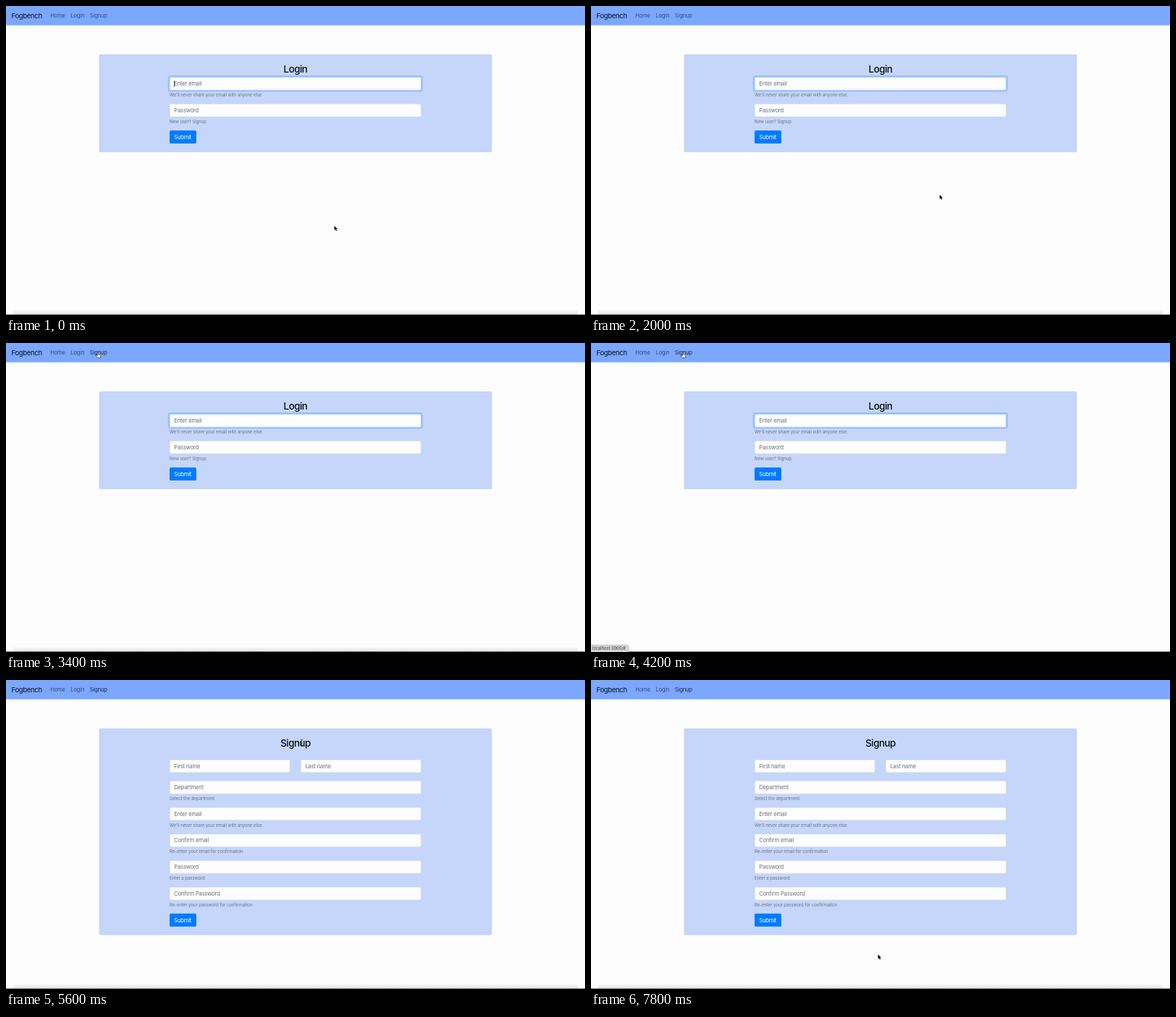
Write an HTML page that moves like this. It is 800 px wide and 427 px high and loops after 8 s.

```html
<!DOCTYPE html>
<html lang="en">
<head>
<meta charset="utf-8">
<title>Login and signup</title>
<style>
html, body { margin: 0; width: 100%; height: 100%; overflow: hidden; background: #fdfdfd; }
svg { display: block; width: 100%; height: 100%; }
text { font-family: Inter, "Open Sans", sans-serif; font-size: 7.62px; letter-spacing: -.024em; }
.brand { font-size: 9.52px; letter-spacing: -.035em; fill: #000; fill-opacity: .9; }
.link { fill: #000; fill-opacity: .54; }
.link.on { fill-opacity: .75; }
.title { font-size: 13.33px; font-weight: 500; letter-spacing: -.036em; text-anchor: middle; fill: #0b0d12; }
.hint { font-size: 6.1px; letter-spacing: -.013em; fill: #6c757d; }
.holder { fill: #6c757d; }
.button { fill: #fff; }
.status { font-size: 5.7px; letter-spacing: 0; fill: #333; }
</style>
</head>
<body>
<svg id="stage" viewBox="0 0 800 427" preserveAspectRatio="none"></svg>
<script>
const LOOP = 8000, STEP = 200, SIGNUP_AT = 4400;

const rect = (x, y, w, h, fill, more = '') =>
  `<rect x="${x}" y="${y}" width="${w}" height="${h}" fill="${fill}" ${more}/>`;
const text = (x, y, cls, s, more = '') => `<text x="${x}" y="${y}" class="${cls}" ${more}>${s}</text>`;

const panel = (h, title) =>
  rect(128.5, 66.7, 542.9, h, '#c5d6fa', 'rx="1.9"') + text(400, 91.5, 'title', title);

function field(y, label, hint = '', x = 226, w = 347.7, focus = false) {
  const ring = focus ? rect(x - 1.2, y - 1.2, w + 2.4, 20.5, 'none', 'rx="2.6" stroke="#94c0fb" stroke-width="2"') : '';
  const edge = focus ? '#80bdff' : '#ced4da';
  return ring +
    rect(x + .24, y + .24, w - .48, 17.6, '#fdfdfd', `rx="1.7" stroke="${edge}" stroke-width=".48"`) +
    text(x + 6.3, y + 11.75, 'holder', label) +
    (hint && text(x, y + 26.6, 'hint', hint));
}

const submit = y => rect(226, y, 37, 18.1, '#007bff', 'rx="1.9"') + text(232.2, y + 11.8, 'button', 'Submit');

const share = "We'll never share your email with anyone else.";

const login = panel(135.4, 'Login') +
  field(98.3, 'Enter email', share, 226, 347.7, true) +
  field(135.1, 'Password', 'New user? Signup') +
  submit(172) +
  rect(232.2, 103.2, .7, 8.6, '#111', 'id="caret"');

const signup = panel(285.8, 'Signup') +
  field(109.9, 'First name', '', 226, 166.5) +
  field(109.9, 'Last name', '', 407.2, 166.5) +
  field(139.3, 'Department', 'Select the department') +
  field(176, 'Enter email', share) +
  field(212.7, 'Confirm email', 'Re-enter your email for confirmation') +
  field(249.4, 'Password', 'Enter a password') +
  field(286.1, 'Confirm Password', 'Re-enter your password for confirmation') +
  submit(322.7);

const pointers = {
  arrow: `<path d="M0 0V6.1L1.4 4.9L2.4 7.1L3.4 6.7L2.5 4.5H4.4Z" fill="#000" stroke="#fff" stroke-width=".6" paint-order="stroke"/>`,
  hand: `<path d="M-.7 .6Q0-.5.7.6V2.9L3.3 3.6Q4 3.9 3.9 4.7L3.2 7.8H-.5L-2.4 5.1Q-2.5 4.1-1.5 4.4L-.7 5Z" fill="#fff" stroke="#111" stroke-width=".6"/>`,
  beam: `<path d="M-1.5-4.3Q0-4.2 0-3.2Q0-4.2 1.5-4.3M0-3.2V3.2M-1.5 4.3Q0 4.2 0 3.2Q0 4.2 1.5 4.3M-.7 1.4H.7" fill="none" stroke="#222" stroke-width=".7"/>`
};

const $ = id => document.getElementById(id);
$('stage').innerHTML = `
<defs><linearGradient id="fade" x2="0" y2="1">
  <stop stop-color="#000" stop-opacity="0"/><stop offset="1" stop-color="#000" stop-opacity=".1"/>
</linearGradient></defs>` +
  rect(0, 0, 800, 427, '#fdfdfd') +
  rect(0, 0, 800, 26.7, '#7ba7ff') +
  text(7.5, 16.9, 'brand', 'Fogbench') +
  text(61.2, 16.3, 'link', 'Home') +
  text(89.3, 16.3, 'link', 'Login') +
  text(115.8, 16.3, 'link', 'Signup', 'id="signupLink"') +
  `<g id="login">${login}</g><g id="signup">${signup}</g>` +
  rect(10, 419, 780, 7.4, 'url(#fade)', 'id="shade" rx="3"') +
  rect(0, 426.3, 800, .7, '#333') +
  `<g id="status">${rect(-2, 417.4, 53.7, 12, '#d6d6d8', 'rx="2" stroke="#a5a5a8" stroke-width=".6"')}` +
  text(2, 424.2, 'status', 'localhost:3000/#') + '</g>' +
  Object.entries(pointers).map(([k, d]) => `<g id="${k}">${d}</g>`).join('');

// Pointer path: time, x, y
const path = [
  [0, 453.7, 303.7], [1200, 466, 290], [2000, 481.7, 260.7], [2400, 390, 110], [2800, 285, 43.8],
  [3000, 210, 18], [3200, 150, 10], [3400, 127, 12.7], [4800, 127, 12.7], [5200, 270, 44],
  [5600, 408.7, 86.2], [6000, 437, 130], [6400, 446, 205], [6800, 425, 315], [7200, 395, 375],
  [7400, 395, 381], [7800, 396.6, 379.3]
];

function pointerAt(t) {
  const i = path.findIndex(p => p[0] > t);
  if (i < 0) return path[path.length - 1].slice(1);
  const a = path[i - 1], b = path[i], k = (t - a[0]) / (b[0] - a[0]);
  return [a[1] + (b[1] - a[1]) * k, a[2] + (b[2] - a[2]) * k];
}

function pointerKind(x, y, onSignup) {
  const within = (l, t, r, b) => x >= l && x <= r && y >= t && y <= b;
  if (within(57, 4, 144, 23)) return 'hand';
  const tops = onSignup ? [109.9, 139.3, 176, 212.7, 249.4, 286.1] : [98.3, 135.1];
  const overField = tops.some(top => within(226, top, 573.7, top + 18));
  return overField || within(379, 78, 421, 96) ? 'beam' : 'arrow';
}

const show = (id, on) => $(id).setAttribute('visibility', on ? 'visible' : 'hidden');

function draw(time) {
  const t = Math.floor(time % LOOP / STEP) * STEP;
  const onSignup = t >= SIGNUP_AT, hinted = t >= 3800 && t < 5000;
  $('login').style.display = onSignup ? 'none' : '';
  $('signup').style.display = onSignup ? '' : 'none';
  show('caret', t % 1200 < 600);
  show('status', hinted);
  show('shade', !hinted);
  $('signupLink').classList.toggle('on', t >= 3400);
  const [x, y] = pointerAt(t), kind = pointerKind(x, y, onSignup);
  for (const k in pointers) show(k, k === kind);
  $(kind).setAttribute('transform', `translate(${x} ${y})`);
}

const start = performance.now();
function tick() {
  draw(performance.now() - start);
  requestAnimationFrame(tick);
}
tick();
</script>
</body>
</html>
```
